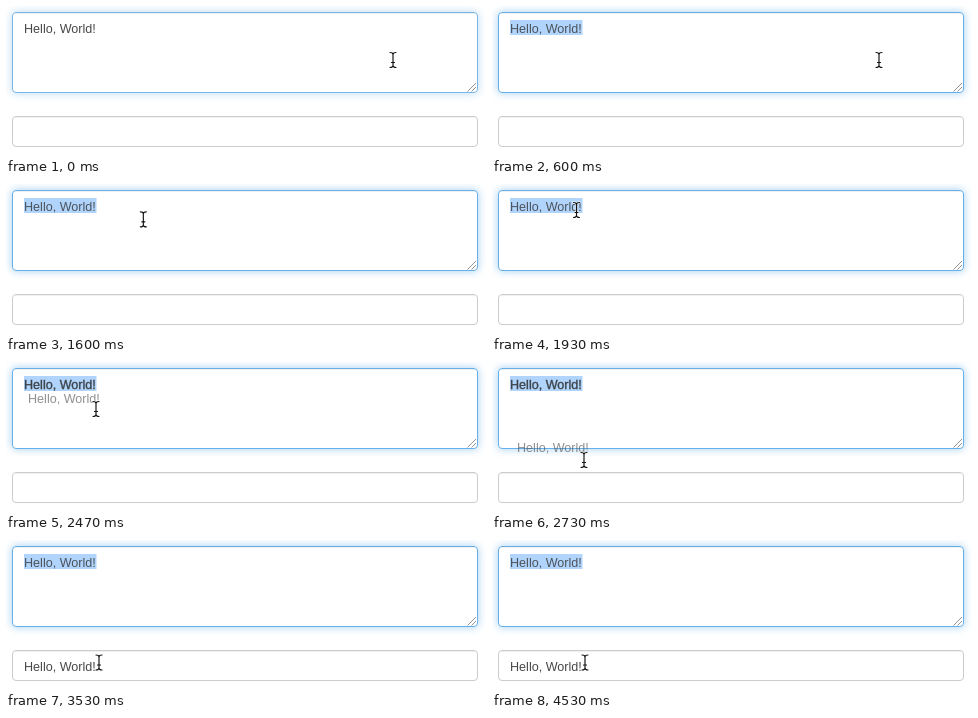
An HTML page with a canvas for the animation above (4590 ms loop, 480 by 150 pixels).

```html
<!DOCTYPE html>
<html lang="en">
<head>
<meta charset="utf-8">
<title>Drag text</title>
<style>
html, body { margin: 0; width: 480px; height: 150px; overflow: hidden; background: #fff; }
canvas { display: block; width: 480px; height: 150px; }
</style>
</head>
<body>
<canvas id="stage"></canvas>
<script>
const W = 480, H = 150, LOOP = 4590, STEP = 1000 / 15;
const TEXT = 'Hello, World!';
const canvas = document.getElementById('stage');
const ctx = canvas.getContext('2d');
const dpr = window.devicePixelRatio || 1;
canvas.width = W * dpr;
canvas.height = H * dpr;

// Pointer path: step, x, y
const path = [
  [14, 387, 54], [17, 353, 54], [20, 279, 51], [22, 176, 40],
  [25, 118, 33], [29, 84.5, 26], [30, 84.5, 24.5], [35, 84.5, 24.5],
  [36, 88.5, 38.5], [37, 90, 47], [40, 91.5, 87.5], [41, 92, 98],
  [42, 92.5, 112], [43, 93, 124], [44, 93, 122.5]
];

function pointerAt(step) {
  if (step <= path[0][0]) return path[0].slice(1);
  for (let i = 1; i < path.length; i++) {
    const [s0, x0, y0] = path[i - 1], [s1, x1, y1] = path[i];
    if (step <= s1) {
      const k = (step - s0) / (s1 - s0);
      return [x0 + (x1 - x0) * k, y0 + (y1 - y0) * k];
    }
  }
  return path[path.length - 1].slice(1);
}

function roundBox(x, y, w, h, r) {
  ctx.beginPath();
  ctx.roundRect(x, y, w, h, r);
}

function line(x0, y0, x1, y1) {
  ctx.beginPath();
  ctx.moveTo(x0, y0);
  ctx.lineTo(x1, y1);
  ctx.stroke();
}

function field(y, h, border, glow) {
  ctx.save();
  roundBox(6, y, 466, h, 4);
  ctx.fillStyle = '#fff';
  if (glow) {
    ctx.shadowColor = `rgba(102,175,233,${0.6 * glow})`;
    ctx.shadowBlur = 8 * dpr;
  }
  ctx.fill();
  ctx.restore();
  ctx.lineWidth = 1;
  ctx.strokeStyle = 'rgba(0,0,0,.06)';
  line(9, y + 1.5, 469, y + 1.5);
  roundBox(6.5, y + 0.5, 465, h - 1, 3.5);
  ctx.strokeStyle = border;
  ctx.stroke();
}

function resizeGrip() {
  ctx.strokeStyle = '#888';
  ctx.lineWidth = 0.9;
  line(461.5, 85.5, 470, 77);
  line(465.5, 85.5, 470, 81);
}

function label(x, y, color, weight = 0) {
  ctx.font = '12.6px "Liberation Sans", Arial, sans-serif';
  ctx.fillStyle = color;
  ctx.fillText(TEXT, x, y);
  if (weight) {
    ctx.strokeStyle = color;
    ctx.lineWidth = weight;
    ctx.strokeText(TEXT, x, y);
  }
}

function beam([x, y]) {
  ctx.save();
  ctx.translate(x, y);
  ctx.lineCap = 'round';
  ctx.lineJoin = 'round';
  ctx.beginPath();
  for (const s of [-1, 1]) {
    ctx.moveTo(-3, 7.5 * s);
    ctx.quadraticCurveTo(-0.3, 7.5 * s, 0, 5.7 * s);
    ctx.quadraticCurveTo(0.3, 7.5 * s, 3, 7.5 * s);
  }
  ctx.moveTo(0, -6);
  ctx.lineTo(0, 6);
  ctx.moveTo(-1.5, 2.5);
  ctx.lineTo(1.5, 2.5);
  ctx.strokeStyle = 'rgba(255,255,255,.8)';
  ctx.lineWidth = 2.4;
  ctx.stroke();
  ctx.strokeStyle = '#111';
  ctx.lineWidth = 1.15;
  ctx.stroke();
  ctx.restore();
}

function draw(time) {
  const step = Math.floor((time + 4) / STEP);
  const focus = Math.min(1, 0.8 + step * 0.1);
  const selected = step >= 6;
  const dragging = step >= 36 && step < 50;
  const dropped = step >= 50;

  ctx.setTransform(dpr, 0, 0, dpr, 0, 0);
  ctx.fillStyle = '#fff';
  ctx.fillRect(0, 0, W, H);

  const mix = (a, b) => Math.round(a + (b - a) * focus);
  field(6, 81, `rgb(${mix(204, 102)},${mix(204, 175)},${mix(204, 233)})`, focus);
  resizeGrip();
  field(110, 31, '#ccc', 0);

  if (selected) {
    ctx.fillStyle = '#b0d4fb';
    ctx.fillRect(18, 14, 72.5, 15);
  }
  if (dragging) label(18, 26.5, '#3c4248', 0.35);
  else label(18, 26.5, selected ? '#4c535b' : '#484848');
  if (dropped) label(18, 130.5, '#484848');

  // The dragged copy trails the pointer by one step.
  if (dragging) {
    const [x, y] = pointerAt(step - 1);
    label(x - 66.5, y + 2, 'rgba(70,70,70,.6)');
  }
  beam(pointerAt(step));
}

let start = null;
function tick(now) {
  if (start === null) start = now;
  draw((now - start) % LOOP);
  requestAnimationFrame(tick);
}
draw(0);
requestAnimationFrame(tick);
</script>
</body>
</html>
```
